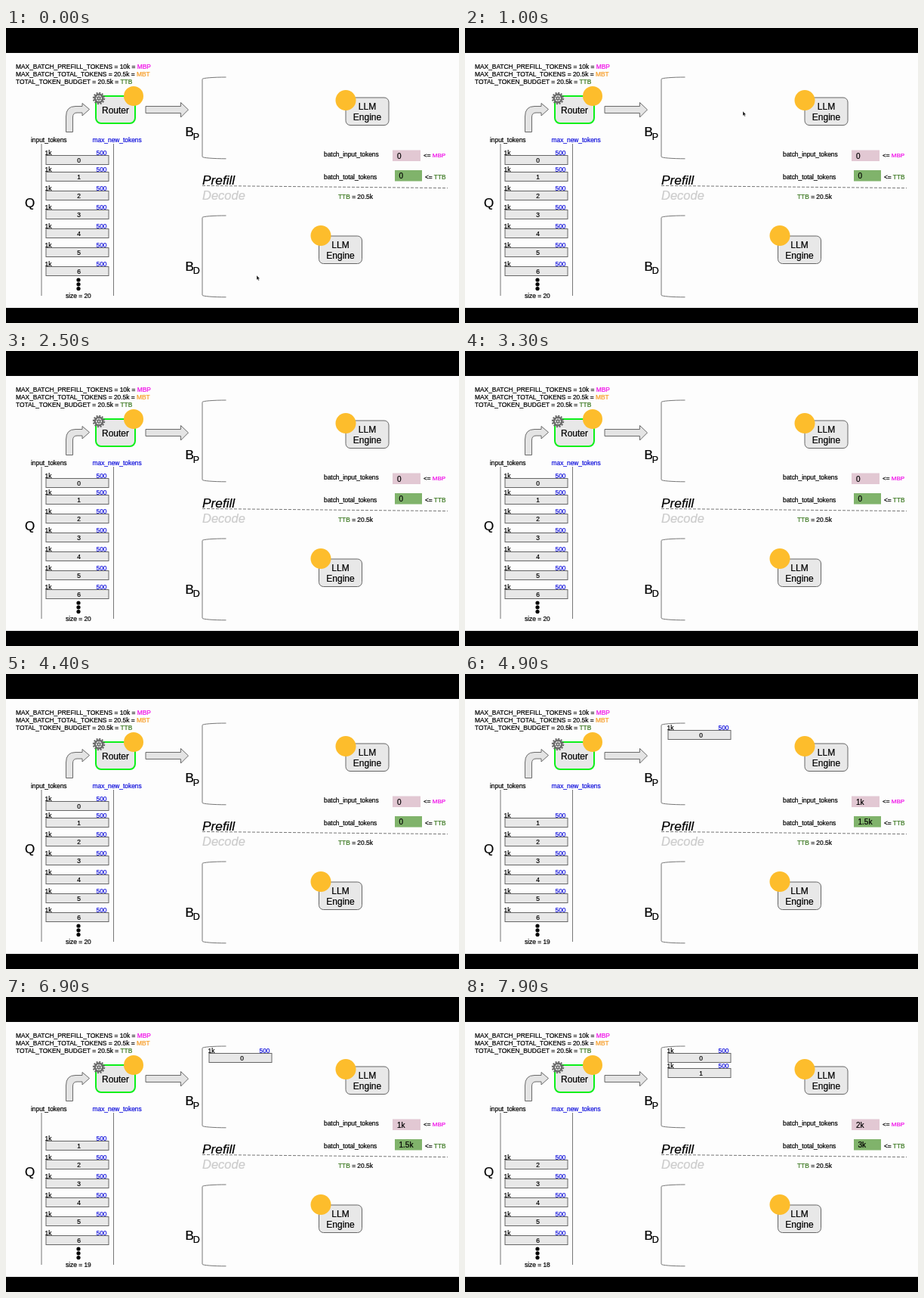
Animation of 600x390 px, one loop 8000 ms. Source, as an HTML page:

```html
<!DOCTYPE html>
<html lang="en">
<head>
<meta charset="utf-8">
<title>Token batching</title>
<style>
  html, body { margin: 0; width: 100%; height: 100%; overflow: hidden; background: #000; }
  svg { display: block; width: 600px; height: 390px; font-family: "Liberation Sans", Arial, sans-serif; }
  text { font-size: 8.4px; color: #000; white-space: pre; }
  text, tspan { fill: currentColor; stroke: currentColor; stroke-width: 0.22px; }
  .blue { color: #1010dc; }
  .mbp { color: #f010e8; }
  .mbt { color: #f79a20; }
  .ttb { color: #38761d; }
  .mid { text-anchor: middle; }
  .box { fill: #e8e8e8; stroke: #666; stroke-width: 1; }
  .arrow { fill: #e4e4e4; stroke: #6a6a6a; stroke-width: 1; stroke-linejoin: round; }
  .line { fill: none; stroke: #777; stroke-width: 1; }
  .face { fill: #fdbd2c; }
</style>
</head>
<body>
<svg id="stage" viewBox="0 0 600 390"></svg>
<script>
const LOOP = 8000, STEP = 100;
const MOVES = [4500, 7600];          // when each request joins the prefill batch
const GEAR_OFF = [5600, 6000];
const CURSOR = { from: [332, 327], to: [368, 110], start: 0, end: 600, hide: 1800 };
const ROW_TOP = [169, 191, 216, 241, 266, 291, 316];
const BATCH_TOP = [75, 95];

const stage = document.getElementById('stage');

function add(tag, attrs, content = '', parent = stage) {
  const el = document.createElementNS('http://www.w3.org/2000/svg', tag);
  for (const key in attrs) el.setAttribute(key, attrs[key]);
  el.innerHTML = content;
  parent.append(el);
  return el;
}
const rect = (x, y, width, height, more) => add('rect', { x, y, width, height, ...more });
const path = (d, cls) => add('path', { d, class: cls });
const text = (x, y, content, more, parent) => add('text', { x, y, ...more }, content, parent);
const face = (cx, cy, r) => add('circle', { cx, cy, r, class: 'face' });
const span = (cls, word) => `<tspan class="${cls}">${word}</tspan>`;

rect(0, 33, 600, 337, { fill: '#fdfdfd' });

// limits
text(13, 53.5, 'MAX_BATCH_PREFILL_TOKENS = 10k = ' + span('mbp', 'MBP'));
text(13, 63.5, 'MAX_BATCH_TOTAL_TOKENS = 20.5k = ' + span('mbt', 'MBT'));
text(13, 73.5, 'TOTAL_TOKEN_BUDGET = 20.5k = ' + span('ttb', 'TTB'));

// router
path('M79.5 137.5V117Q79.5 103.5 92 103.5H101V99.5L110.5 107.5L101 116V112H94Q88.5 112 88.5 118V137.5Z', 'arrow');
path('M185 103.5H231.5V98.5L241.5 108L231.5 118V112.5H185Z', 'arrow');
rect(119, 90, 52, 36, { rx: 7, fill: '#e8e8e8', stroke: '#0cf01a', 'stroke-width': 2 });
text(145, 112.5, 'Router', { class: 'mid', style: 'font-size:12px' });
face(169, 90, 13);

const gear = add('g', { transform: 'translate(123 93)' });
add('circle', { r: 7.2, fill: 'none', stroke: '#666', 'stroke-width': 2, 'stroke-dasharray': '2.1 1.67' }, '', gear);
add('circle', { r: 5.3, fill: '#ddd', stroke: '#666', 'stroke-width': 2.2 }, '', gear);
for (let i = 0; i < 6; i++)
  add('path', { d: 'M0 0V5', stroke: '#777', 'stroke-width': 1.1, transform: `rotate(${i * 60})` }, '', gear);
add('circle', { r: 1.7, fill: '#e4e4e4', stroke: '#666', 'stroke-width': 1.2 }, '', gear);

// engines
function engine(x, y, faceX, faceY) {
  rect(x, y, 57, 36.5, { rx: 6, class: 'box' });
  ['LLM', 'Engine'].forEach((word, i) =>
    text(x + 28.5, y + 15.7 + i * 14.3, word, { class: 'mid', style: 'font-size:12px' }));
  face(faceX, faceY, 13.5);
}
engine(450, 92, 450, 95.5);
engine(414.5, 275, 417, 274.5);

// queue
text(33, 150.5, 'input_tokens');
text(114.5, 150.5, 'max_new_tokens', { class: 'blue' });
path('M47 153V354M142.5 153V354', 'line');
text(25, 237, 'Q', { style: 'font-size:17px' });
for (const cy of [333, 338.8, 344.6]) add('circle', { cx: 96, cy, r: 2.6 });
const size = text(79, 357.2, '');

// batches: brackets close with long flat arcs
function batch(top, base, sub, drop) {
  path(`M291.5 ${top}A31.5 2.6 0 0 0 260 ${top + 2.6}V${top + 105.2}A31.5 2.6 0 0 0 291.5 ${top + 107.8}`, 'line');
  text(237.5, base, 'B', { style: 'font-size:17px' });
  text(247.8, base + drop, sub, { style: 'font-size:12.5px' });
}
batch(65, 143, 'P', 5.2);
batch(248, 320.5, 'D', 4);
text(260, 206.7, 'Prefill', { style: 'font-size:17.3px;font-style:italic' });
text(260, 227.4, 'Decode', { style: 'font-size:16.5px;font-style:italic;color:#ccc' });
add('path', { d: 'M260 208.4L585 211.6', class: 'line', 'stroke-dasharray': '4 2' });
text(440, 225.7, span('ttb', 'TTB') + ' = 20.5k');

// counters
text(421, 170.3, 'batch_input_tokens');
text(421, 199.6, 'batch_total_tokens');
rect(512, 161.5, 37, 14.5, { fill: '#e2c8d3' });
rect(515, 188, 36, 14.5, { fill: '#80b36b' });
const inputCount = text(518, 172.7, '', { style: 'font-size:10px' });
const totalCount = text(520.5, 198.7, '', { style: 'font-size:10px' });
text(553, 171.2, '&lt;= ' + span('mbp', 'MBP'), { style: 'font-size:8.1px' });
text(555, 199.8, '&lt;= ' + span('ttb', 'TTB'), { style: 'font-size:8.3px' });

// requests
const rows = ROW_TOP.map((top, i) => {
  const g = add('g', {});
  add('rect', { x: 53, y: -0.5, width: 83, height: 12, class: 'box' }, '', g);
  text(51.5, -1.2, '1k', {}, g);
  text(119.5, -1.2, '500', { class: 'blue' }, g);
  text(96.5, 8.6, i, { class: 'mid' }, g);
  return g;
});

const cursor = add('path', {
  d: 'M0 0V6L1.4 4.9L2.4 7L3.4 6.5L2.5 4.5H4.3Z',
  fill: '#111', stroke: '#fff', 'stroke-width': 0.4
});

const show = (el, on) => el.setAttribute('visibility', on ? 'visible' : 'hidden');
const place = (el, x, y) => el.setAttribute('transform', `translate(${x} ${y})`);
const thousands = n => n ? n + 'k' : '0';

function draw(t) {
  const moved = MOVES.filter(at => t >= at).length;
  rows.forEach((row, i) => i < moved ? place(row, 216, BATCH_TOP[i]) : place(row, 0, ROW_TOP[i]));
  size.textContent = 'size = ' + (20 - moved);
  inputCount.textContent = thousands(moved);
  totalCount.textContent = thousands(moved * 1.5);

  show(gear, t < GEAR_OFF[0] || t >= GEAR_OFF[1]);

  const { from, to, start, end, hide } = CURSOR;
  const p = Math.min(1, Math.max(0, (t - start) / (end - start)));
  const ease = p * p * (3 - 2 * p);
  place(cursor, ...from.map((v, i) => v + (to[i] - v) * ease));
  show(cursor, t < hide);
}

const began = performance.now();
function tick() {
  const t = (performance.now() - began) % LOOP;
  draw(Math.floor(t / STEP) * STEP);
  requestAnimationFrame(tick);
}
tick();
</script>
</body>
</html>
```
